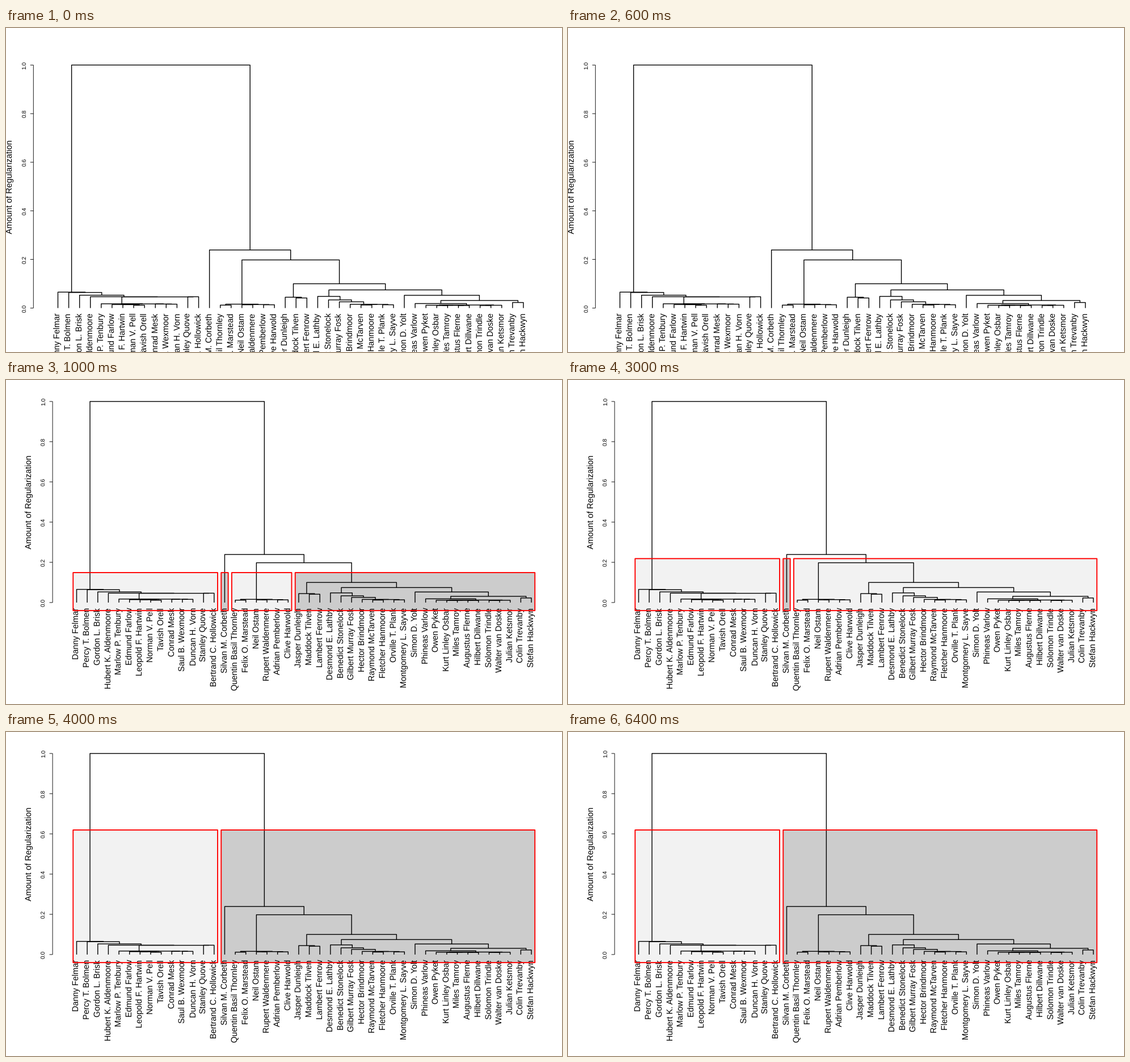
Recreate the animation shown at these times as a matplotlib script. Size 980 by 572 pixels, loop 8 s.

```python
import matplotlib.pyplot as plt
from matplotlib.animation import FuncAnimation
from matplotlib.patches import Rectangle

W, H, DPI = 980, 572, 100
PT = 72 / DPI  # points per pixel

plt.rcParams["font.family"] = "Liberation Sans"
plt.rcParams["text.hinting"] = "none"

NAMES = """Danny Felmar,Percy T. Bolmen,Gordon L. Brisk,Hubert K. Aldenmoore,
Marlow P. Tenbury,Edmund Farlow,Leopold F. Hartwin,Norman V. Pell,Tavish Orell,
Conrad Mesk,Saul B. Wexmoor,Duncan H. Vorn,Stanley Quove,Bertrand C. Hollowick,
Silvan M. Corbeth,Quentin Basil Thornley,Felix O. Marstead,Neil Ostam,
Rupert Waldenmere,Adrian Pemberlow,Clive Harwold,Jasper Dunleigh,Maddock Tilven,
Lambert Fenrow,Desmond E. Lathby,Benedict Stonelock,Gilbert Murray Fosk,
Hector Brindmoor,Raymond McTarven,Fletcher Hanmoore,Orville T. Plank,
Montgomery L. Sayve,Simon D. Yolt,Phineas Varlow,Owen Pyket,Kurt Linley Osbar,
Miles Tamroy,Augustus Flerne,Hilbert Dillwane,Solomon Trindle,Walter van Doske,
Julian Ketsmor,Colin Trevanby,Stefan Hackwyn""".replace("\n", "").split(",")

# A node is (height, left, right); a leaf is None, numbered left to right.
o = None


def pair(h):
    return (h, o, o)


MODERN = (.0655, o, (.064, o, (.053, o, (.0465, o, (
    .046,
    (.0175, o, (.017,
                (.0145, o, (.014, o, pair(.0115))),
                (.0165, o, pair(.016)))),
    pair(.0465))))))
FOUNDERS = (.016, pair(.012), (.0145, pair(.0135), pair(.0135)))
GILDED = (.048, o, (.0335, o, (.0256, o, (
    .0155, o, (.015, pair(.0125), pair(.0135))))))
EARLY = (.0125, (.0115, o, (.011, pair(.0105), pair(.0105))),
         (.0115, pair(.0105), o))
ANTEBELLUM = (.0525, o, (.031, (.0185, o, EARLY), pair(.0228)))
TREE = (1.0, MODERN, (.239, o, (.198, FOUNDERS, (
    .100, (.0445, o, pair(.0415)), (.0746, GILDED, ANTEBELLUM)))))


def brackets(tree):
    """Return the U-shaped links as lists of (leaf position, height)."""
    links, count = [], 0

    def walk(node):
        nonlocal count
        if node is None:
            count += 1
            return count - 1, 0
        h, left, right = node
        (xl, hl), (xr, hr) = walk(left), walk(right)
        links.append([(xl, hl), (xl, h), (xr, h), (xr, hr)])
        return (xl + xr) / 2, h

    walk(tree)
    return links


LINKS = brackets(TREE)

# Layouts: first leaf x, leaf step, baseline y, unit height, axis x
CLOSE = (91.5, 19.08, 494.4, 429, 48.3)
FULL = (124.5, 18.64, 392.9, 355, 82.1)

PALE, DARK = .05, .2
# Cuts: height halfway between two merges, then (first leaf, last leaf, shade)
CUT4 = ((.198 + .100) / 2,
        [(0, 13, PALE), (14, 14, DARK), (15, 20, PALE), (21, 43, DARK)])
CUT3 = ((.239 + .198) / 2, [(0, 13, PALE), (14, 14, DARK), (15, 43, PALE)])
CUT2 = ((1 + .239) / 2, [(0, 13, PALE), (14, 43, DARK)])

fig = plt.figure(figsize=(W / DPI, H / DPI), dpi=DPI, facecolor="white")
ax = fig.add_axes([0, 0, 1, 1])


def line(xs, ys, width):
    ax.plot(xs, ys, color="black", lw=width * PT, snap=False,
            solid_joinstyle="round", solid_capstyle="butt")


def upright(x, y, text, size, ha):
    ax.text(x, y, text, fontsize=size * PT, rotation=90, ha=ha,
            va="baseline", rotation_mode="anchor", color="black")


def draw_plot(layout):
    x0, step, base, unit, axis = layout
    line([axis, axis], [base, base - unit], .9)
    for k in range(6):
        y = base - unit * k / 5
        line([axis - 5.5, axis], [y, y], .9)
        upright(axis - 12.3, y, f"{k / 5:.1f}", 10.3, "center")
    upright(axis - 37.2, base - unit / 2, "Amount of Regularization", 14.7, "center")

    for link in LINKS:
        line([x0 + step * x for x, _ in link],
             [base - unit * h for _, h in link], 1.4)
    for i, name in enumerate(NAMES):
        # centre each label on its leaf, descenders included
        drop = 3.7 if set(name) & set("gjpqyQ") else 5.2
        upright(x0 + step * i + drop, base + 8.9, name, 14.5, "right")


def draw_boxes(layout, cut):
    x0, step, base, unit, _ = layout
    height, groups = cut
    top, bottom = base - unit * height, base + unit * .04
    for first, last, shade in groups:
        left = x0 + step * (first - 1 / 3)
        width = step * (last - first + 2 / 3)
        ax.add_patch(Rectangle((left, top), width, bottom - top, snap=False,
                               fc=(0, 0, 0, shade), ec="red", lw=1.9 * PT,
                               joinstyle="round", zorder=5))


def update(second):
    ax.clear()
    ax.set(xlim=(0, W), ylim=(H, 0))
    ax.axis("off")
    if second < 1:
        draw_plot(CLOSE)
        return
    draw_plot(FULL)
    draw_boxes(FULL, CUT4 if second < 3 else CUT3 if second < 4 else CUT2)


anim = FuncAnimation(fig, update, frames=8, interval=1000, repeat=True,
                     repeat_delay=0, init_func=lambda: None)
plt.show()
```
